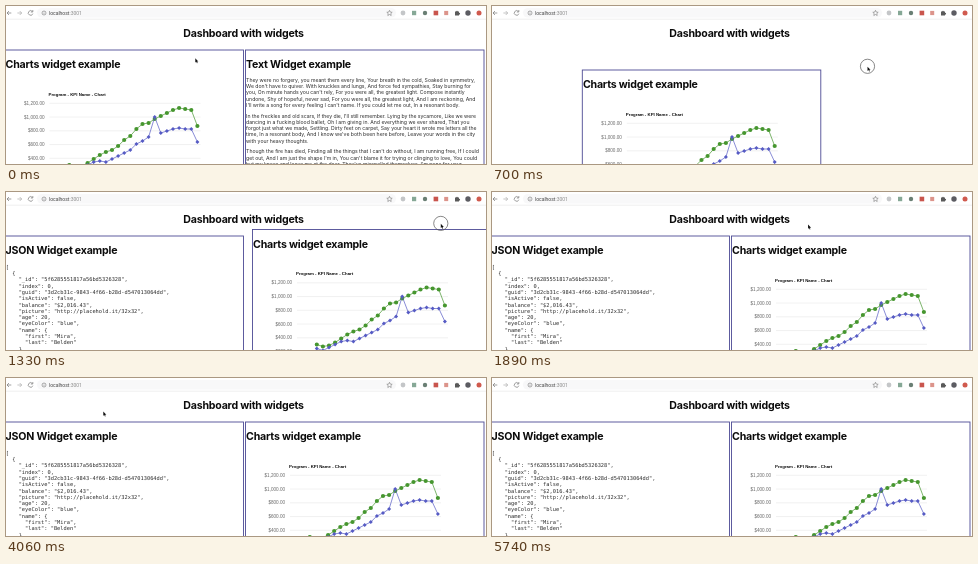
Recreate the animation shown at these times as an HTML page. Size 480 by 158 pixels, loop 5950 ms.

```html
<!DOCTYPE html>
<html lang="en">
<head>
<meta charset="utf-8">
<title>Dashboard with widgets</title>
<style>
  html, body { margin: 0; width: 100%; height: 100%; overflow: hidden; background: #fff; }
  svg { display: block; width: 480px; height: 158px; }
  text { white-space: pre; fill: #0c0c0c; }
  .head { font: 700 10.6px Inter, sans-serif; letter-spacing: -.02em; }
  .body { font: 400 5.15px Inter, sans-serif; letter-spacing: -.004em; fill: #2c2c2c; }
  .code { font: 400 5.33px "DejaVu Sans Mono", monospace; fill: #2c2c2c; }
  .chart { font: 700 4.35px "Liberation Sans", sans-serif; }
  .axis { font: 400 4.6px "Liberation Sans", sans-serif; fill: #666; text-anchor: end; }
  .url { font: 400 5px Roboto, sans-serif; fill: #444; }
  .frame { fill: #fff; stroke: #4d4b94; stroke-width: .9; }
  .icon { fill: none; stroke: #777; stroke-width: .7; }
</style>
</head>
<body>
<svg id="stage" viewBox="0 0 480 158" xmlns="http://www.w3.org/2000/svg">
  <rect width="480" height="158" fill="#fff"/>
  <text class="head" x="237.6" y="31" text-anchor="middle">Dashboard with widgets</text>
  <g id="json"></g>
  <g id="words"></g>
  <g id="charts"></g>
  <g id="toolbar">
    <rect width="480" height="13" fill="#fff"/>
    <rect x="31" y="2" width="359" height="9.6" rx="4.8" fill="#f8f8f9"/>
    <path d="M0 13.2H480" stroke="#e6e6e6" stroke-width=".6"/>
    <path class="icon" d="M5.3 7H1M3 5L1 7L3 9"/>
    <path class="icon" style="stroke:#aaa" d="M11.4 7H15.7M13.7 5L15.7 7L13.7 9"/>
    <path class="icon" d="M26.3 5.4A2.3 2.3 0 1 0 26.8 7.7M26.8 4V6H24.8"/>
    <circle class="icon" cx="38" cy="7" r="2" style="stroke-width:.6"/>
    <path class="icon" d="M38 6.7V8.1M38 5.7V6.2" style="stroke-width:.5"/>
    <text class="url" x="43" y="8.7">localhost<tspan fill="#888">:3001</tspan></text>
    <path class="icon" style="stroke-width:.6" d="M383.5 4.3l.8 1.8 1.9.2-1.4 1.3.4 1.9-1.7-1-1.7 1 .4-1.9-1.4-1.3 1.9-.2z"/>
    <circle cx="397" cy="7" r="2.4" fill="#c4c6c8"/>
    <rect x="406" y="4.8" width="4.2" height="4.4" fill="#86a896"/>
    <circle cx="419" cy="7" r="2.2" fill="#6a7f74"/>
    <rect x="427.6" y="4.7" width="4.6" height="4.6" fill="#c9554d"/>
    <rect x="438.2" y="4.9" width="4" height="4.2" fill="#dc948b"/>
    <path d="M449 5.6h1.2a.8.8 0 1 1 1.6 0H453v1.3a.8.8 0 1 1 0 1.5v1.2h-4z" fill="#5a5a5a"/>
    <circle cx="462" cy="7" r="2.7" fill="#5c5c62"/>
    <circle cx="473" cy="7" r="2.5" fill="#d05a4e"/>
  </g>
  <g id="pointer">
    <circle id="press" r="7.1" cy="-.4" fill="none" stroke="#555" stroke-width=".7"/>
    <path transform="scale(.82)" d="M0 0V5.2L1.2 4.1L2 6L2.9 5.6L2.1 3.8H3.7Z" fill="#111" stroke="#fff" stroke-width=".4" paint-order="stroke"/>
  </g>
</svg>
<script>
const LOOP = 5950, STEP = 70, LEFT = -1, RIGHT = 239.5, TOP = 44, BELOW = 164;
const el = id => document.getElementById(id);

const escapeText = s => s.replace(/&/g, '&amp;').replace(/</g, '&lt;');
const label = (cls, x, y, s) => `<text class="${cls}" x="${x}" y="${y}">${escapeText(s)}</text>`;
const widget = (heading, content) =>
  `<rect class="frame" width="238.5" height="240"/>${label('head', .6, 18, heading)}${content}`;

const paragraphs = [
  `They were no forgery, you meant them every line, Your breath in the cold, Soaked in symmetry,
We don't have to quiver. With knuckles and lungs, And force fed sympathies, Stay burning for
you, On minute hands you can't rely, For you were all, the greatest light. Compose instantly
undone, Shy of hopeful, never sad, For you were all, the greatest light, And I am reckoning, And
I'll write a song for every feeling I can't name. If you could let me out, In a resonant body.`,
  `In the freckles and old scars, If they die, I'll still remember. Lying by the sycamore, Like we were
dancing in a fucking blood ballet, Oh I am giving in. And everything we ever shared, That you
forgot just what we made, Settling. Dirty feet on carpet, Say your heart it wrote me letters all the
time, In a resonant body, And I know we've both been here before, Leave your words in the city
with your heavy thoughts.`,
  `Though the fire has died, Finding all the things that I can't do without, I am running free, If I could
get out, And I am just the shape I'm in, You can't blame it for trying or clinging to love, You could
but my knees and leave me at the door, They've misspelled themselves, I'm none for your`
];

const json = `[
  {
    "_id": "5f6285551817a56bd5326328",
    "index": 0,
    "guid": "3d2cb31c-9843-4f66-b28d-d547013064dd",
    "isActive": false,
    "balance": "$2,016.43",
    "picture": "http://placehold.it/32x32",
    "age": 20,
    "eyeColor": "blue",
    "name": {
      "first": "Mira",
      "last": "Belden"
    },`;

// Heights of the plotted values, measured down from the top of the widget.
const green = [115, 117, 116, 113, 109, 105, 102, 100, 96, 90, 86, 79, 74, 73, 69, 66, 63, 60, 58, 59, 60, 76];
const blue = [119, 121, 118, 115, 112, 111, 112, 109, 106, 103, 100, 94, 91, 87, 67, 83, 81, 79, 78, 79, 79, 92];

function series(values, color, marker) {
  const points = values.map((y, i) => [+(64.3 + 6.1 * i).toFixed(1), y]);
  return `<polyline points="${points.join(' ')}" fill="none" stroke="${color}" stroke-width=".7"/>` +
    `<path fill="${color}" d="${points.map(([x, y]) => `M${x} ${y}${marker}`).join('')}"/>`;
}

function chartContent() {
  let out = label('chart', 43.5, 45.6, 'Program - KPI Name - Chart');
  for (let i = 0; i < 6; i++) {
    const y = 53.3 + 13.75 * i;
    const amount = (1200 - 200 * i).toLocaleString('en-US') + '.00';
    out += `<path d="M44.5 ${y}H195.5" stroke="#e2e2e2" stroke-width=".5"/>` + label('axis', 39.5, y + 1.6, '$' + amount);
  }
  return out + series(green, '#46962f', 'm-2.1 0a2.1 2.1 0 1 0 4.2 0a2.1 2.1 0 1 0 -4.2 0z') +
    series(blue, '#565bc4', 'm0 -2.1l2 2.1l-2 2.1l-2 -2.1z');
}

el('charts').innerHTML = widget('Charts widget example', chartContent());
el('json').innerHTML = widget('JSON Widget example',
  json.split('\n').map((s, i) => label('code', .8, 32.9 + 6.28 * i, s)).join(''));
el('words').innerHTML = widget('Text Widget example', paragraphs.map((p, k) =>
  p.split('\n').map((s, i) => label('body', .6, 31.9 + 35.7 * k + 6.25 * i, s)).join('')).join(''));

const smooth = u => u * u * (3 - 2 * u);
const linear = u => u;

// Position along a list of [time, x, y] keys.
function along(keys, t, ease) {
  const n = keys.findIndex(k => k[0] > t);
  if (n < 0) return keys[keys.length - 1].slice(1);
  if (n === 0) return keys[0].slice(1);
  const [t0, x0, y0] = keys[n - 1], [t1, x1, y1] = keys[n];
  const u = ease((t - t0) / (t1 - t0));
  return [x0 + (x1 - x0) * u, y0 + (y1 - y0) * u];
}

const pointerPath = [
  [140, 189.3, 52.3], [420, 270, 58], [700, 375.5, 60.7], [980, 387.2, 59.4], [1120, 405, 51],
  [1330, 434.8, 31.8], [1750, 434.8, 31.8], [2100, 97.5, 34], [2170, 97.5, 34], [2590, 24.6, 9.2],
  [2940, 24.6, 9.2], [3290, 97.3, 33.6]
];
const chartPath = [
  [210, LEFT, TOP], [420, 15, 57], [700, 90.3, 64], [980, 195, 65.5], [1120, 216, 57],
  [1330, 246.5, 37.5], [1400, 246.5, 37.5], [1610, RIGHT, TOP]
];
const wordsPath = [[350, RIGHT, TOP], [630, RIGHT, BELOW]];
const jsonPath = [[1050, LEFT, BELOW], [1260, LEFT, TOP]];

const place = (id, [x, y]) => el(id).setAttribute('transform', `translate(${x.toFixed(2)} ${y.toFixed(2)})`);
const show = (id, on) => el(id).setAttribute('display', on ? 'inline' : 'none');

function draw(t) {
  place('charts', along(chartPath, t, linear));
  place('words', along(wordsPath, t, smooth));
  place('json', along(jsonPath, t, smooth));
  place('pointer', along(pointerPath, t, t < 1750 ? linear : smooth));
  show('pointer', t < 4550);
  show('press', t >= 140 && t < 1470);
}

const start = performance.now();
function tick() {
  const t = (performance.now() - start) % LOOP;
  draw(Math.floor(t / STEP) * STEP);
  requestAnimationFrame(tick);
}
draw(0);
requestAnimationFrame(tick);
</script>
</body>
</html>
```
